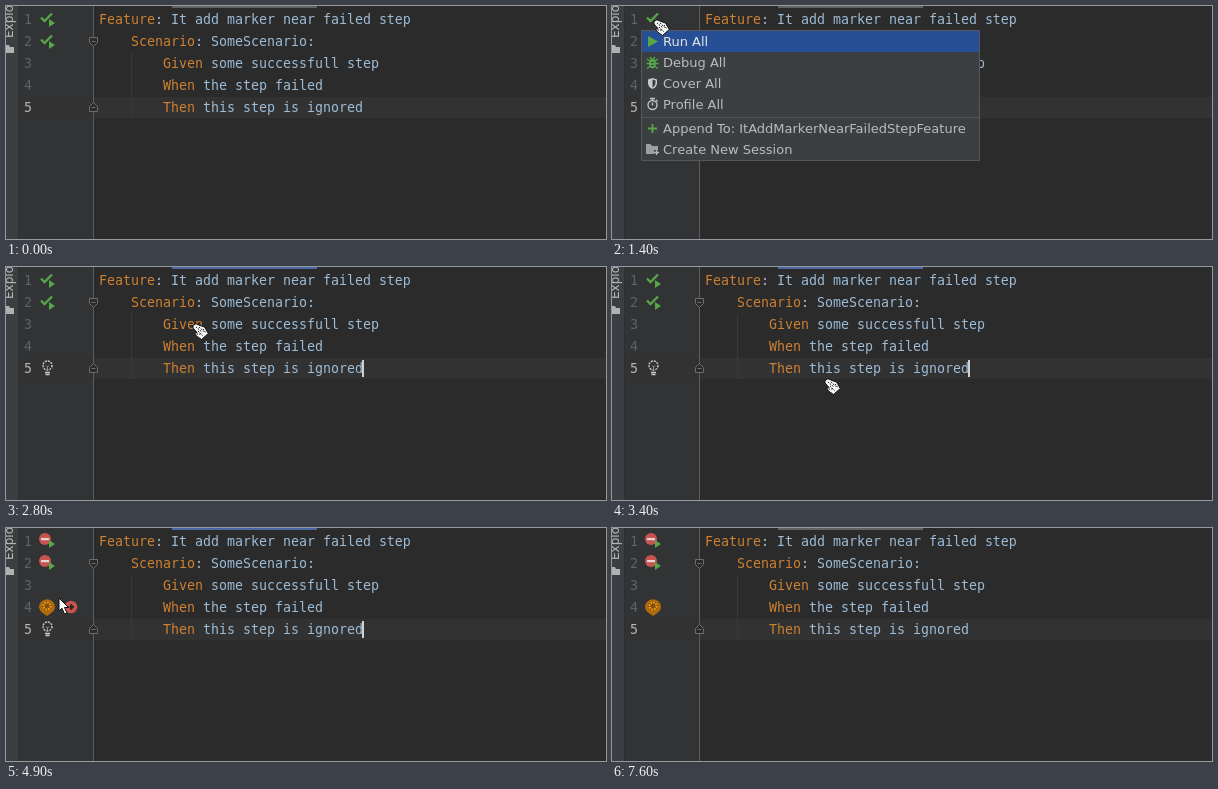
An HTML page for the animation above (8500 ms loop, 600 px wide and 233 px high).

```html
<!DOCTYPE html>
<html lang="en">
<head>
<meta charset="utf-8">
<title>Step marker demo</title>
<style>
html, body { margin: 0; width: 100%; height: 100%; overflow: hidden; background: #2b2b2b; }
svg { display: block; width: 600px; height: 233px; }
.code { font: 13.29px "DejaVu Sans Mono", monospace; fill: #9cbbd6; }
.code .key { fill: #cc8032; }
.code .colon { fill: #a9b7c6; }
.num { fill: #606366; }
.num.now { fill: #b4b4b4; }
.ui { font: 13px "DejaVu Sans", sans-serif; fill: #bbb; }
.line { fill: none; stroke-width: 1; }
</style>
</head>
<body>
<svg viewBox="0 0 600 233">
  <defs>
    <path id="play" d="M0 0L6 4L0 8Z" fill="#57a64a"/>
    <g id="pass">
      <path d="M1 5.5L4.500 9L12 1.500" fill="none" stroke="#57a64a" stroke-width="2.300"/>
      <use href="#play" x="9" y="7"/>
    </g>
    <g id="fail">
      <circle cx="5" cy="5" r="6" fill="#c75450"/>
      <path d="M1 4h8v2.200h-8z" fill="#e6d3d2"/>
      <use href="#play" x="9" y="6"/>
    </g>
  </defs>

  <rect width="600" height="233" fill="#2b2b2b"/>
  <rect x="13" width="74" height="233" fill="#313335"/>
  <rect x="13" y="91" width="587" height="21" fill="#323232"/>
  <rect width="12" height="233" fill="#3c3f41"/>
  <rect x="12" width="1" height="233" fill="#2d2f30"/>
  <text class="ui" style="font-size:12px" transform="translate(7 32) rotate(-90)">Explo</text>
  <path d="M0 39h3l1 2h4v6h-8z" fill="#afb1b3"/>
  <rect id="bar" x="166" width="145" height="2"/>

  <path class="line" d="M125.500 47V112" stroke="#393939"/>
  <path class="line" d="M87.500 0V233" stroke="#5a5b5c"/>
  <g class="line" stroke="#6b6d6e" style="fill:#2b2b2b">
    <path d="M83.500 31.500h8v5l-4 4l-4 -4zM85.500 35.500h4"/>
    <path d="M83.500 105.500h8v-5l-4 -4l-4 4zM85.500 101.500h4"/>
  </g>

  <g class="code">
    <text class="num" x="18" y="18">1</text>
    <text class="num" x="18" y="40">2</text>
    <text class="num" x="18" y="62">3</text>
    <text class="num" x="18" y="84">4</text>
    <text class="num now" x="18" y="106">5</text>
    <text x="93" y="18"><tspan class="key">Feature</tspan><tspan class="colon">:</tspan> It add marker near failed step</text>
    <text x="125" y="40"><tspan class="key">Scenario</tspan><tspan class="colon">:</tspan> SomeScenario:</text>
    <text x="157" y="62"><tspan class="key">Given</tspan> some successfull step</text>
    <text x="157" y="84"><tspan class="key">When</tspan> the step failed</text>
    <text x="157" y="106"><tspan class="key">Then</tspan> this step is ignored</text>
  </g>
  <rect id="caret" x="356" y="93" width="2" height="17" fill="#d0d0d0"/>

  <g id="passed"><use href="#pass" x="34" y="6"/><use href="#pass" x="34" y="28"/></g>
  <g id="failed"><use href="#fail" x="34" y="6"/><use href="#fail" x="34" y="28"/></g>

  <g id="bulb" fill="none" stroke="#c8c8c8">
    <circle cx="41.500" cy="98.500" r="4.500" stroke-width="1.400" stroke-dasharray="2 1"/>
    <path d="M40 98.500l1.500 1.500l1.500 -1.500M41.500 100v3" stroke="#999"/>
    <path d="M39 105.500h5M39.500 107.500h4" stroke-width="1.300"/>
  </g>

  <g id="marker">
    <path d="M41 88l-4 -2.800A8 7.500 0 1 1 45 85.200Z" fill="#b06a0c"/>
    <circle cx="41" cy="78" r="4.500" fill="#83500f"/>
    <circle cx="41" cy="78" r="3.500" fill="none" stroke="#f2a51c" stroke-width="2" stroke-dasharray="1.600 1.100"/>
  </g>
  <g id="add">
    <circle cx="65" cy="79" r="6.300" fill="#c75450"/>
    <path d="M62 79h5M64.500 76.500v5M65 76.500l3 2.500l-3 2.500z" stroke="#3a2525" fill="#3a2525"/>
  </g>

  <g id="menu" class="ui">
    <rect x="29.500" y="24.500" width="338" height="130" fill="#3c3f41" stroke="#555759"/>
    <rect x="30" y="25" width="337" height="21" fill="#264f95"/>
    <path d="M30 111.500H367" stroke="#515355"/>
    <text x="51" y="40" fill="#e4e4e4">Run All</text>
    <text x="51" y="61">Debug All</text>
    <text x="51" y="82">Cover All</text>
    <text x="51" y="103">Profile All</text>
    <text x="51" y="127">Append To: ItAddMarkerNearFailedStepFeature</text>
    <text x="51" y="148">Create New Session</text>
    <path d="M36 30l10 5.500l-10 5.500z" fill="#57a64a"/>
    <g fill="#57a64a" stroke="#57a64a">
      <ellipse cx="40.500" cy="57.500" rx="3.500" ry="5" stroke="none"/>
      <path d="M35 53l3 2M46 53l-3 2M34.500 57.500h12M35 62.500l3 -2M46 62.500l-3 -2M38 51l1.500 2M43 51l-1.500 2" fill="none" stroke-width="1.300"/>
      <path d="M39 56.500h3M39 59.500h3" stroke="#3c3f41"/>
    </g>
    <path d="M36 73.500l4.500 -1.500l4.500 1.500v4q-.5 4 -4.500 5.500q-4 -1.500 -4.500 -5.500z" fill="#c8cacb"/>
    <path d="M40.500 73.500l3 1v3q-.3 2.500 -3 4z" fill="#3c3f41"/>
    <g fill="none" stroke="#c0c2c3" stroke-width="1.400">
      <circle cx="40.500" cy="99" r="4.500"/>
      <path d="M38 92.500h5M40.500 92.500v2M40.500 96.500v3M44 94l1.500 1.500"/>
    </g>
    <path d="M40.500 118v9M36 122.500h9" stroke="#57a64a" stroke-width="1.800"/>
    <path d="M34 138h4.500l1.500 2h6v4h-4v4h-8z" fill="#9aa0a4"/>
    <path d="M44.500 144v5M42 146.500h5" stroke="#b8bcbe" stroke-width="1.400"/>
  </g>

  <g id="cursor">
    <g id="hand">
      <path d="M1 2.500L4 .7L8 2.500L12.500 4L16.300 10.500L9.500 16.500L4.500 13L2.500 10.500L5 9.500L1 5Z" fill="#f4f4f4" stroke="#111"/>
      <path d="M4 4l6 5M7 4l5 4.500M4.500 11h4M6 8l5 5M11 6l3 4" fill="none" stroke="#222" stroke-dasharray="1.500 1"/>
    </g>
    <path id="arrow" d="M0 0V13L3 10.300L5.500 16L8 15L5.500 9.500H9.500Z" fill="#fff" stroke="#111"/>
  </g>
</svg>
<script>
const LOOP = 8500, STEP = 100;
const $ = id => document.getElementById(id);

// Pointer path: time, x, y
const path = [
  [300, 150, -20], [700, 85, 2], [1100, 38, 10], [1300, 38, 10], [2000, 58, 28],
  [2400, 58, 29], [2800, 186, 56], [3000, 245, 88], [3300, 224, 114],
  [3600, 188, 104], [3700, 188, 104], [3800, 184, 102], [3900, 184, 102],
  [4100, 172, 97], [4800, 57, 71], [4900, 53, 70], [5300, 48, 75],
  [7000, 48, 75], [7600, 100, -20]
];

// Half-open spans of visibility
const spans = {
  caret: [[400, 3800], [4100, 4400], [4800, 5300], [5800, 6400], [6800, 7200]],
  bulb: [[400, 1300], [2500, 7400]],
  menu: [[1300, 2300]],
  passed: [[0, 4000]],
  failed: [[4000, LOOP]],
  marker: [[4500, LOOP]],
  add: [[4700, 5100]],
  cursor: [[400, 7600]],
  hand: [[900, 4600]],
  arrow: [[0, 900], [4600, LOOP]]
};
const focus = [[400, 1300], [2300, 7400]];

const within = (list, t) => list.some(([a, b]) => t >= a && t < b);

function pointer(t) {
  const i = path.findIndex(p => p[0] >= t);
  if (i < 1) return path[i < 0 ? path.length - 1 : 0].slice(1);
  const [t0, x0, y0] = path[i - 1], [t1, x1, y1] = path[i];
  const k = (t - t0) / (t1 - t0);
  return [x0 + (x1 - x0) * k, y0 + (y1 - y0) * k].map(Math.round);
}

function draw(now) {
  const t = Math.floor(now % LOOP / STEP) * STEP;
  for (const id in spans) $(id).style.display = within(spans[id], t) ? "" : "none";
  $("bar").setAttribute("fill", within(focus, t) ? "#4a67a8" : "#5f6366");
  $("cursor").setAttribute("transform", `translate(${pointer(t)})`);
}

const start = performance.now();
function frame() {
  draw(performance.now() - start);
  requestAnimationFrame(frame);
}
frame();
</script>
</body>
</html>
```
